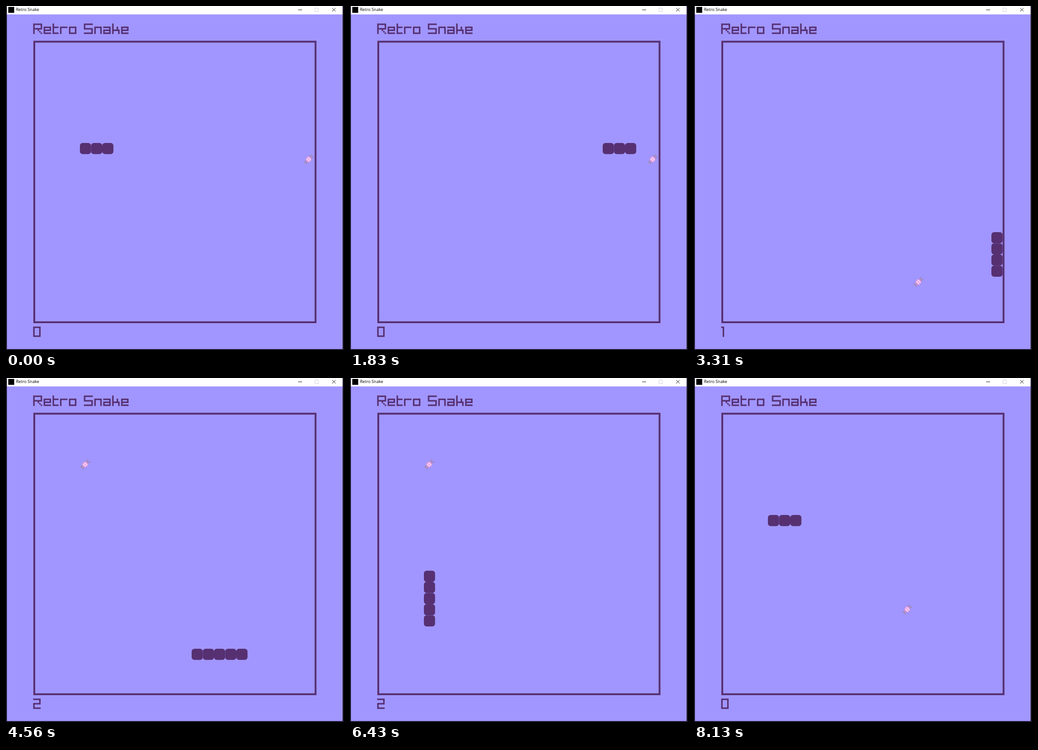
An HTML page that plays this animation: 741 by 756 pixels, repeating every 8240 ms.

```html
<!DOCTYPE html>
<html lang="en">
<head>
<meta charset="utf-8">
<title>Retro Snake</title>
<style>
  html, body { margin: 0; width: 100%; height: 100%; overflow: hidden; }
  svg { display: block; }
  .pixel { fill: none; stroke: #563071; stroke-linecap: square; }
</style>
</head>
<body>
<svg width="741" height="756" viewBox="0 0 741 756">
  <defs>
    <g id="candy" transform="translate(11.4 11.6) rotate(-45)">
      <path d="M5 0L10.5 -4L9.5 0L10.5 4ZM-5 0L-10.5 -4L-9.5 0L-10.5 4Z" fill="#b198d0" stroke="#9a82a0"/>
      <ellipse rx="6.6" ry="6" fill="#e29be3" stroke="#b583cb" stroke-width=".8"/>
      <path d="M-2.6 -4.6Q-.4 0 -2.6 4.6M1.6 -5Q3.8 0 1.6 5" fill="none" stroke="#fdeafa" stroke-width="1.7"/>
    </g>
  </defs>
  <rect width="741" height="756" fill="#1b1726"/>
  <rect x="2" width="736" height="754" fill="#a196ff"/>
  <rect x="2" width="736" height="18.5" fill="#fff"/>
  <rect x="5" y="2" width="13" height="13"/>
  <text x="22" y="11.4" font-family="Open Sans, sans-serif" font-size="9.1">Retro Snake</text>
  <g fill="none" stroke="#111">
    <path d="M640.5 8.5h8.5M715 4.5l7.5 7.5m0-7.5l-7.5 7.5"/>
    <path d="M677.5 4.5h7.5v7.5h-7.5z" stroke="#ccd0dc"/>
  </g>
  <rect class="pixel" x="62" y="78.4" width="616.6" height="616.6" stroke-width="4"/>
  <g id="title" class="pixel" transform="translate(59.6 38.6) scale(3.267)"></g>
  <g id="score" class="pixel" transform="translate(59.6 704.5) scale(3.267)"></g>
  <g id="snake" fill="#563071"></g>
  <use id="food" href="#candy"/>
</svg>
<script>
const LOOP = 8240, CELL = 24.5, LEFT = 64, TOP = 80.5;
const $ = id => document.getElementById(id);

// Each letter: width in font pixels, pen path through pixel centres
const letters = {
  R: [6, 'M.5 6.5V.5h5v3h-5M3.5 4.5h0M4.5 5.5h0M5.5 6.5h0'],
  e: [5, 'M.5 4.5h4v-2h-4v4h4'],
  t: [4, 'M.5 .5v6h3M.5 2.5h3'],
  r: [5, 'M.5 6.5v-4h4'],
  o: [5, 'M.5 2.5h4v4h-4z'],
  ' ': [3, ''],
  S: [6, 'M5.5 .5h-5v3h5v3h-5'],
  n: [5, 'M.5 6.5v-4h4v4'],
  a: [5, 'M.5 2.5h4v4h-4v-2h4'],
  k: [5, 'M.5 .5v6M.5 4.5h4v2M3.5 2.5v2']
};
const digits = ['M.5 .5h4v6h-4z', 'M.5 .5h1v6', 'M.5 .5h4v3h-4v3h4', 'M.5 .5h4v6h-4M.5 3.5h4'];

let pen = 0;
for (const char of 'Retro Snake') {
  const [width, path] = letters[char];
  $('title').innerHTML += `<path transform="translate(${pen})" d="${path}"/>`;
  pen += width + 1;
}

// Runs of moves: first time, last time, count
const moves = [
  [140, 690, 6], [830, 1610, 8], [1720, 1940, 3], [2090, 2870, 8],
  [2980, 3740, 8], [3890, 4670, 8], [4780, 5540, 8], [5650, 6430, 8],
  [6540, 6770, 3], [6920, 7690, 8], [7800, 8130, 4]
].flatMap(([first, last, count]) => Array.from({ length: count },
  (_, i) => Math.round((first + (last - first) * i / (count - 1)) / 10) * 10));

const meals = [19, 37, 67], CRASH = 72;
const foods = [[24, 10], [17, 21], [4, 4], [2, 13]];

function cellAt(step) {
  if (step <= 18) return [6 + step, 9];
  if (step <= 30) return [24, step - 9];
  if (step <= 50) return [54 - step, 21];
  return [4, 71 - step];
}

const toPixels = ([col, row]) => [LEFT + col * CELL, TOP + row * CELL];

let shown = -1;
function draw() {
  const time = performance.now() % LOOP;
  const step = moves.filter(at => at <= time).length;
  if (step !== shown) {
    shown = step;
    const crashed = step === CRASH;
    const head = crashed ? 0 : step;
    const score = meals.filter(meal => meal <= head).length;
    const length = 3 + meals.filter(meal => meal < head).length;
    $('snake').innerHTML = Array.from({ length }, (_, i) => {
      const [x, y] = toPixels(cellAt(head - i));
      return `<rect x="${x}" y="${y}" width="${CELL}" height="${CELL}" rx="6.1"/>`;
    }).join('');
    $('score').innerHTML = `<path d="${digits[score]}"/>`;
    const food = crashed ? [16, 17] : foods[score];
    $('food').setAttribute('transform', `translate(${toPixels(food)})`);
  }
  requestAnimationFrame(draw);
}
draw();
</script>
</body>
</html>
```
